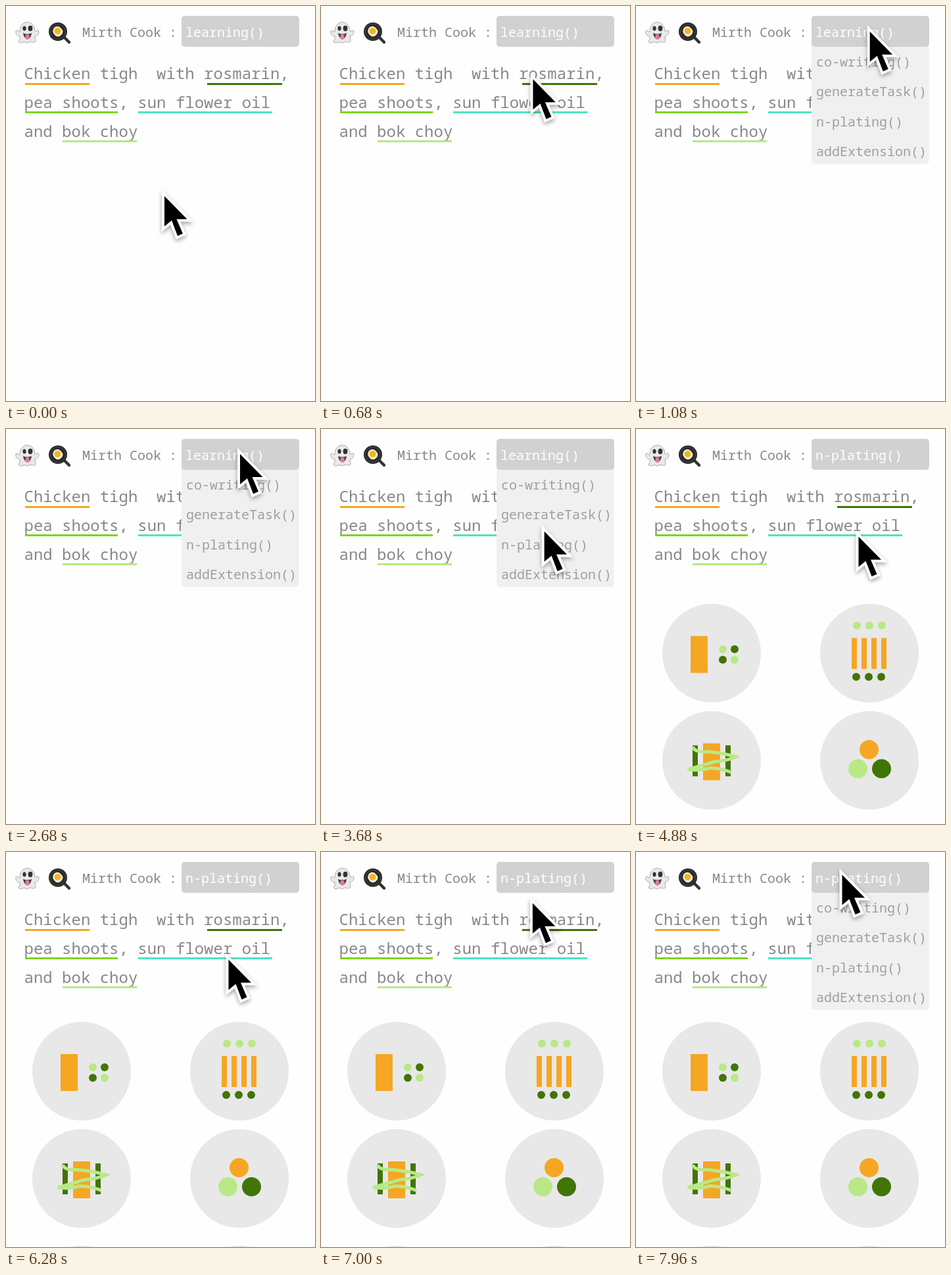
Recreate the animation shown at these times as an HTML page. Size 470 by 600 pixels, loop 8000 ms.

```html
<!DOCTYPE html>
<html lang="en">
<head>
<meta charset="utf-8">
<title>Recipe assistant</title>
<style>
  html, body { margin: 0; width: 100%; height: 100%; overflow: hidden; background: #fefefe; }
  svg { display: block; width: 470px; height: 600px; }
  text { font: 500 20px "Roboto Mono", "Noto Sans Mono", "DejaVu Sans Mono", monospace; fill: #888; white-space: pre; }
  .recipe text { font-size: 24px; font-weight: 400; }
  .recipe path { stroke-width: 3; }
  .menu text { fill: #9f9f9f; }
  .plate { fill: #e8e8e8; }
  .meat { fill: #f5a623; }
  .leaf { fill: #b8e986; }
  .herb { fill: #417505; }
  #cursor { filter: drop-shadow(0 3px 3px rgba(0, 0, 0, .35)); }
</style>
</head>
<body>
<svg viewBox="0 0 470 600">
  <g id="ghost">
    <path d="M21 39C21 20 43 20 44 38C45 40 49 34 50 39C50 44 46 46 44 46C44 52 47 54 43 55C39 56 38 53 35 55C31 58 29 53 26 55C22 57 19 56 19 53C22 52 21 49 21 46C17 46 14 42 15 38C17 35 19 40 21 39Z" fill="#e9e9e9" stroke="#aaa"/>
    <ellipse cx="28" cy="34" rx="2.6" ry="3.6" fill="#333"/>
    <ellipse cx="37" cy="34" rx="3.4" ry="4.2" fill="#333"/>
    <path d="M26 41Q32 44 39 41Q38 50 32 50Q27 49 26 41Z" fill="#444"/>
    <ellipse cx="32.500" cy="47" rx="3.200" ry="4" fill="#e8798c"/>
  </g>
  <g id="pan">
    <path d="M88 47L96 55" stroke="#333" stroke-width="4.500" stroke-linecap="round"/>
    <circle cx="79" cy="39" r="14" fill="#292929"/>
    <circle cx="79" cy="39" r="11.500" fill="none" stroke="#4a4a4a"/>
    <path d="M73 33Q79 28 84 34Q89 39 84 44Q79 49 74 44Q69 39 73 33Z" fill="#f2ead0"/>
    <circle cx="78.500" cy="38" r="4.800" fill="#f2b51d"/>
  </g>
  <text x="116" y="47">Mirth Cook :</text>

  <g class="recipe">
    <text x="27.500" y="111">Chicken tigh  with rosmarin,</text>
    <text x="27.500" y="155">pea shoots, sun flower oil</text>
    <text x="27.500" y="199">and bok choy</text>
    <path d="M29 118.500H127" stroke="#f5a623"/>
    <path d="M306 118.500H420" stroke="#417505"/>
    <path d="M29 161.500H170" stroke="#7ed321"/>
    <path d="M201 161.500H405" stroke="#50e3c2"/>
    <path d="M86 205.500H199" stroke="#b8e986"/>
  </g>

  <g id="plates">
    <g class="plate">
      <circle cx="115" cy="333" r="75"/><circle cx="355" cy="333" r="75"/>
      <circle cx="115" cy="496" r="75"/><circle cx="355" cy="496" r="75"/>
      <circle cx="115" cy="673" r="75"/><circle cx="355" cy="673" r="75"/>
    </g>
    <path class="meat" d="M83 307h26v56h-26zM328 310h8v47h-8zM343 310h8v47h-8zM358 310h8v47h-8zM373 310h8v47h-8z"/>
    <g class="leaf">
      <circle cx="132" cy="327" r="6"/><circle cx="150" cy="343" r="6"/>
      <circle cx="336" cy="291" r="6"/><circle cx="355" cy="291" r="6"/><circle cx="374" cy="291" r="6"/>
      <circle cx="337.500" cy="508.500" r="14.500"/>
    </g>
    <g class="herb">
      <circle cx="150" cy="327" r="6"/><circle cx="132" cy="343" r="6"/>
      <circle cx="335" cy="369" r="6"/><circle cx="354" cy="369" r="6"/><circle cx="373" cy="369" r="6"/>
      <circle cx="373.500" cy="508.500" r="14.500"/>
      <path d="M86 473h8v47h-8zM136 473h8v47h-8z"/>
    </g>
    <circle class="meat" cx="354.500" cy="479.500" r="14.500"/>
    <path class="meat" d="M102 470h26v56h-26z"/>
    <path d="M86 475Q89 484 108 482.500Q135 485 152 490.500Q140 496 119 498Q92 506 79 509.500Q98 512 112 507.500Q126 507 145 514"
      fill="none" stroke="#b8e986" stroke-width="5"/>
  </g>

  <g id="menu" class="menu">
    <rect x="267" y="15" width="178.500" height="225" rx="5" fill="#f0f0f0"/>
    <text x="274" y="92">co-writing()</text>
    <text x="274" y="137">generateTask()</text>
    <text x="274" y="183">n-plating()</text>
    <text x="274" y="228">addExtension()</text>
  </g>
  <rect x="267" y="15" width="179" height="47" rx="5" fill="#d1d1d1"/>
  <text id="label" x="273" y="47" style="fill:#fff"></text>

  <g id="cursor">
    <path d="M0 0V46L11 37L20 60.500L28 57L18.500 35H34.500Z" stroke="#fff" stroke-width="8" stroke-miterlimit="6" paint-order="stroke"/>
  </g>
</svg>
<script>
  const LOOP = 8000, MOVE = 1220, SELECT = 4160;
  const byId = id => document.getElementById(id);
  const menu = byId('menu'), label = byId('label'), plates = byId('plates'), cursor = byId('cursor');

  // Cursor stops: [start of move, x, y]
  const start = [239, 293];
  const moves = [[-100, 356, 38], [2660, 338.5, 163.5], [6260, 313.5, 34.5]];

  function ease(t, begin, duration) {
    const u = Math.min(1, Math.max(0, (t - begin) / duration));
    return (1 - Math.cos(Math.PI * u)) / 2;
  }

  function render(t) {
    let [x, y] = start;
    for (const [begin, toX, toY] of moves) {
      const p = ease(t, begin, MOVE);
      x += (toX - x) * p;
      y += (toY - y) * p;
    }
    cursor.setAttribute('transform', `translate(${x} ${y})`);

    const open = (t >= 880 && t < SELECT) || t >= 7120;
    menu.setAttribute('visibility', open ? 'visible' : 'hidden');
    label.textContent = t < SELECT ? 'learning()' : 'n-plating()';

    const drop = 342 * (1 - ease(t, 4125, 835));
    plates.setAttribute('transform', `translate(0 ${drop})`);
    plates.setAttribute('visibility', t < SELECT ? 'hidden' : 'visible');
  }

  const origin = performance.now();
  function tick() {
    render((performance.now() - origin) % LOOP);
    requestAnimationFrame(tick);
  }
  tick();
</script>
</body>
</html>
```
